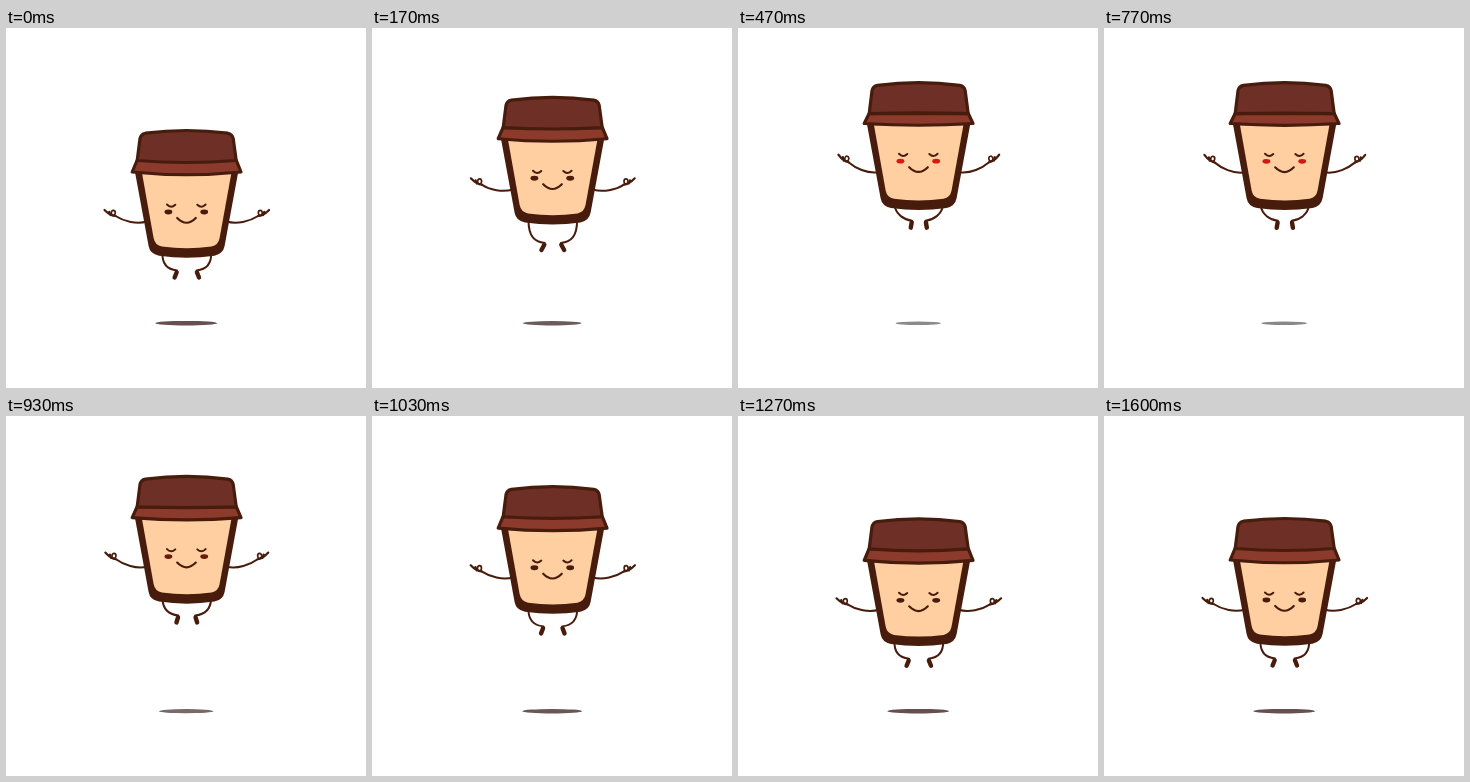
An HTML page for the animation above (1930 ms loop, 360 by 360 pixels).

```html
<!DOCTYPE html>
<html lang="en">
<head>
<meta charset="utf-8">
<title>Floating cup</title>
<style>
  html, body { margin: 0; width: 100%; height: 100%; overflow: hidden; background: #fff; }
  svg { display: block; width: 100vw; height: 100vh; }
  .line { fill: none; stroke: #481c0c; stroke-linecap: round; stroke-linejoin: round; }
</style>
</head>
<body>
<svg viewBox="0 0 360 360">
  <defs>
    <g id="limbs">
      <path id="leg" class="line" stroke-width="2"/>
      <path id="foot" class="line" stroke-width="4.4"/>
      <path id="arm" class="line" stroke-width="2"/>
      <g id="hand" class="line">
        <path d="M0 0Q-5 0-11-6M-5-1L-6.2-4.2" stroke-width="2.2"/>
        <ellipse cx="-2.2" cy="-3.2" rx="2" ry="2.5" stroke-width="1.7"/>
      </g>
    </g>
    <g id="eyes">
      <path class="line" d="M161 75.5Q165 79.8 169.3 75.8" stroke-width="2"/>
    </g>
    <ellipse id="cheek" cx="162.4" cy="83" rx="3.9" ry="2.4"/>
  </defs>

  <ellipse id="shadow" cx="180.2" cy="295.2" ry="2.2"/>

  <g id="body">
    <use href="#limbs"/>
    <use href="#limbs" transform="matrix(-1 0 0 1 361.6 0)"/>

    <path fill="#481c0c" d="M128.8 42L142.6 117Q144 125 153 126.7Q180.8 130.8 208.5 126.7Q217 125 218.6 117L232.4 42Z"/>
    <path fill="#ffcfa2" d="M136 44L147.6 109Q149 116.4 156 117.6Q180.8 121 205.5 117.6Q212.2 116.4 213.6 109L225.4 44Z"/>
    <path id="brim" class="line" style="fill:#8b3a2c" stroke-width="3.2"/>
    <path id="lid" class="line" style="fill:#6e2f26" stroke-width="3.2"/>

    <g id="face">
      <use href="#eyes"/>
      <use href="#eyes" transform="matrix(-1 0 0 1 360.6 0)"/>
      <use href="#cheek"/>
      <use href="#cheek" transform="matrix(-1 0 0 1 360.6 0)"/>
      <path class="line" d="M171.2 89Q180.5 98.5 189.8 89" stroke-width="2.2"/>
    </g>
  </g>
</svg>

<script>
const LOOP = 1930;
const $ = id => document.getElementById(id);

// Each track holds [time, value] pairs.
const height = [[0, 101], [40, 95], [100, 81.5], [170, 68], [240, 60.5], [320, 56],
  [400, 54], [470, 53.2], [600, 52.7], [770, 53.2], [900, 57], [1030, 69],
  [1070, 75], [1130, 85], [1200, 95.5], [1270, 101.3], [1400, 101.3], [1600, 101], [LOOP, 101]];
const pose = [[0, 0], [60, 0.02], [170, 0.2], [320, 0.72], [470, 1], [600, 1],
  [770, 0.97], [900, 0.55], [1030, 0.12], [1130, 0], [LOOP, 0]];
const drag = [[0, 0], [80, 0.6], [170, 1], [320, 0.45], [470, 0], [LOOP, 0]];

// Monotone cubic through the track's points.
function sample(track, t) {
  let i = 0;
  while (i < track.length - 2 && t >= track[i + 1][0]) i++;
  const slope = k => k < 0 || k > track.length - 2 ? 0
    : (track[k + 1][1] - track[k][1]) / (track[k + 1][0] - track[k][0]);
  const tangent = k => {
    const a = slope(k - 1), b = slope(k);
    return a * b <= 0 ? 0 : 2 * a * b / (a + b);
  };
  const [t0, v0] = track[i], [t1, v1] = track[i + 1];
  const d = t1 - t0, u = (t - t0) / d, w = 1 - u;
  return v0 * (1 + 2 * u) * w * w + tangent(i) * d * u * w * w
    + v1 * u * u * (3 - 2 * u) - tangent(i + 1) * d * u * u * w;
}

const mix = (a, b, p) => a + (b - a) * p;
const blend = (a, b, p) => `rgb(${a.map((v, i) => Math.round(mix(v, b[i], p)))})`;

function draw(t) {
  const y = sample(height, t), p = sample(pose, t), lag = sample(drag, t);

  $("body").setAttribute("transform", `translate(0 ${y})`);

  const wx = mix(109.5, 110.5, p), wy = mix(87, 81, p) + 3 * lag;
  const sy = mix(92.5, 91, p) + 1.5 * lag;
  $("arm").setAttribute("d",
    `M141 ${sy}C${mix(131, 129, p)} ${sy + mix(3, 2, p)} ${mix(118, 117, p)} ${wy + 5.5} ${wx} ${wy}`);
  $("hand").setAttribute("transform", `translate(${wx} ${wy}) rotate(${8 * p})`);

  const ax = mix(171, 174, p) + lag, ay = mix(141.5, 139.5, p) + 6 * lag;
  $("leg").setAttribute("d",
    `M156.5 124C${mix(156, 158, p)} ${ay - 6} ${mix(162, 166, p)} ${ay - 1} ${ax} ${ay}`);
  $("foot").setAttribute("d",
    `M${ax - 0.3} ${ay + 1.8}L${mix(168.6, 172.8, p)} ${ay + 7}`);

  const seam = mix(31.5, 32.5, p), bow = mix(4, -1.5, p);
  const hem = mix(43, 42.3, p), sag = mix(5.5, 3.5, p);
  $("lid").setAttribute("d",
    `M131.2 ${seam}L134 9.5Q134.8 5.2 139.5 4.2Q180.6-1.2 221.7 4.2Q226.4 5.2 227.2 9.5L230.2 ${seam}Q180.7 ${seam + bow} 131.2 ${seam}Z`);
  $("brim").setAttribute("d",
    `M131 ${seam}L126.2 ${hem}Q180.7 ${hem + sag} 235 ${hem}L230.4 ${seam}Z`);

  $("face").setAttribute("transform", `translate(0 ${-3 * p})`);
  $("cheek").setAttribute("fill", blend([72, 28, 12], [222, 22, 18], p * p));

  $("shadow").setAttribute("rx", mix(30.8, 22.7, p));
  $("shadow").setAttribute("ry", mix(2.3, 1.8, p));
  $("shadow").setAttribute("fill", blend([102, 79, 78], [138, 138, 138], p));
}

const start = performance.now();
function tick() {
  draw((performance.now() - start) % LOOP);
  requestAnimationFrame(tick);
}
tick();
</script>
</body>
</html>
```
